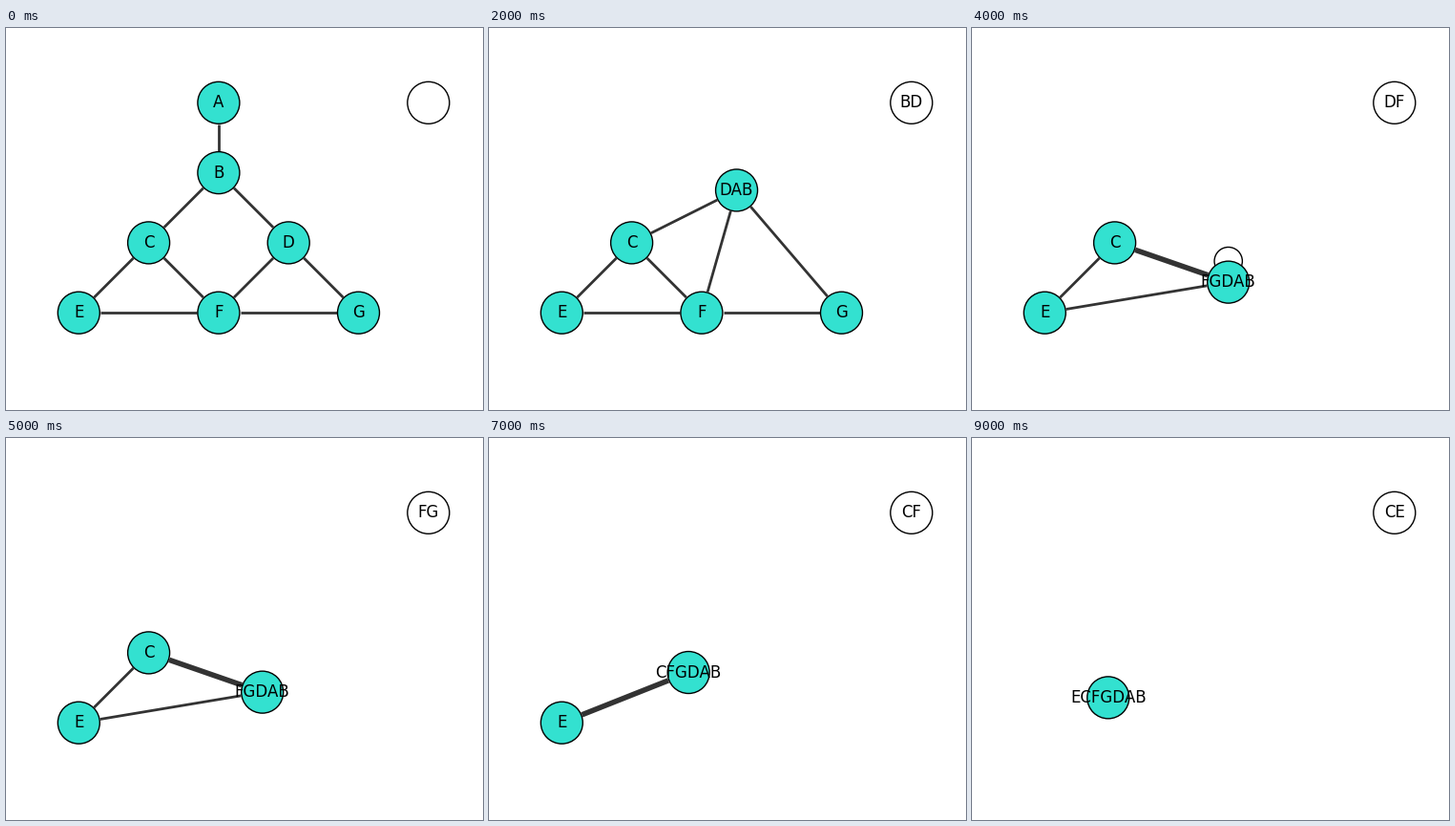
Write a matplotlib script that moves like this. It is 500 by 400 pixels and loops after 10 s.

```python
import math

import matplotlib.pyplot as plt
from matplotlib.animation import FuncAnimation
from matplotlib.patches import Circle

W, H, DPI = 500, 400, 100
UNIT = 73.3
X0, Y0 = 76.3, 298.2
RADIUS, LOOP_RADIUS = 0.3 * UNIT, 0.2 * UNIT
TURQUOISE, EDGE_COLOR = "#33e1d0", "#333333"

GRID = {"A": (2, 3), "B": (2, 2), "C": (1, 1), "D": (3, 1),
        "E": (0, 0), "F": (2, 0), "G": (4, 0)}
# Edges in the order they are contracted
EDGES = ["AB", "BD", "DG", "DF", "FG", "BC", "CF", "EF", "CE"]

plt.rcParams["font.family"] = "DejaVu Sans"
fig = plt.figure(figsize=(W / DPI, H / DPI), dpi=DPI, facecolor="white")
ax = fig.add_axes([0, 0, 1, 1])


def to_px(x, y):
    return X0 + x * UNIT, Y0 - y * UNIT


def find(groups, letter):
    return next(name for name in groups if letter in name)


def contract(count):
    """Merge the ends of the first `count` edges, each time at their midpoint."""
    groups = {name: to_px(*cell) for name, cell in GRID.items()}
    for edge in EDGES[:count]:
        a, b = sorted((find(groups, c) for c in edge), key=len)
        if a != b:
            (xa, ya), (xb, yb) = groups.pop(a), groups.pop(b)
            groups[a + b] = (xa + xb) / 2, (ya + yb) / 2
    return groups


def draw_circle(x, y, r, color, z):
    ax.add_patch(Circle((x, y), r, fc=color, ec="black", lw=1, zorder=z))


def draw_node(x, y, label, color):
    draw_circle(x, y, RADIUS, color, 3)
    ax.text(x, y, label, fontsize=12, ha="center", va="center", zorder=4)


def draw_edge(p, q, width):
    dx, dy = q[0] - p[0], q[1] - p[1]
    k = 0.31 * UNIT / math.hypot(dx, dy)
    ax.plot([p[0] + k * dx, q[0] - k * dx], [p[1] + k * dy, q[1] - k * dy],
            color=EDGE_COLOR, lw=width, solid_capstyle="butt", zorder=1)


def draw(step):
    ax.clear()
    ax.set_xlim(0, W)
    ax.set_ylim(H, 0)
    ax.axis("off")

    groups = contract(step)
    links = {}
    for edge in EDGES[step:]:
        pair = tuple(sorted(find(groups, c) for c in edge))
        links[pair] = links.get(pair, 0) + 1

    for (a, b), count in links.items():
        if a == b:
            x, y = groups[a]
            draw_circle(x, y - RADIUS, LOOP_RADIUS, "white", 2)
        else:
            draw_edge(groups[a], groups[b], 2 * count)

    for name, (x, y) in groups.items():
        draw_node(x, y, name, TURQUOISE)
    draw_node(*to_px(5, 3), EDGES[step - 1] if step else "", "white")
    return []


anim = FuncAnimation(fig, draw, frames=len(EDGES) + 1, init_func=lambda: [],
                     interval=1000, repeat=True, repeat_delay=0)
plt.show()
```
